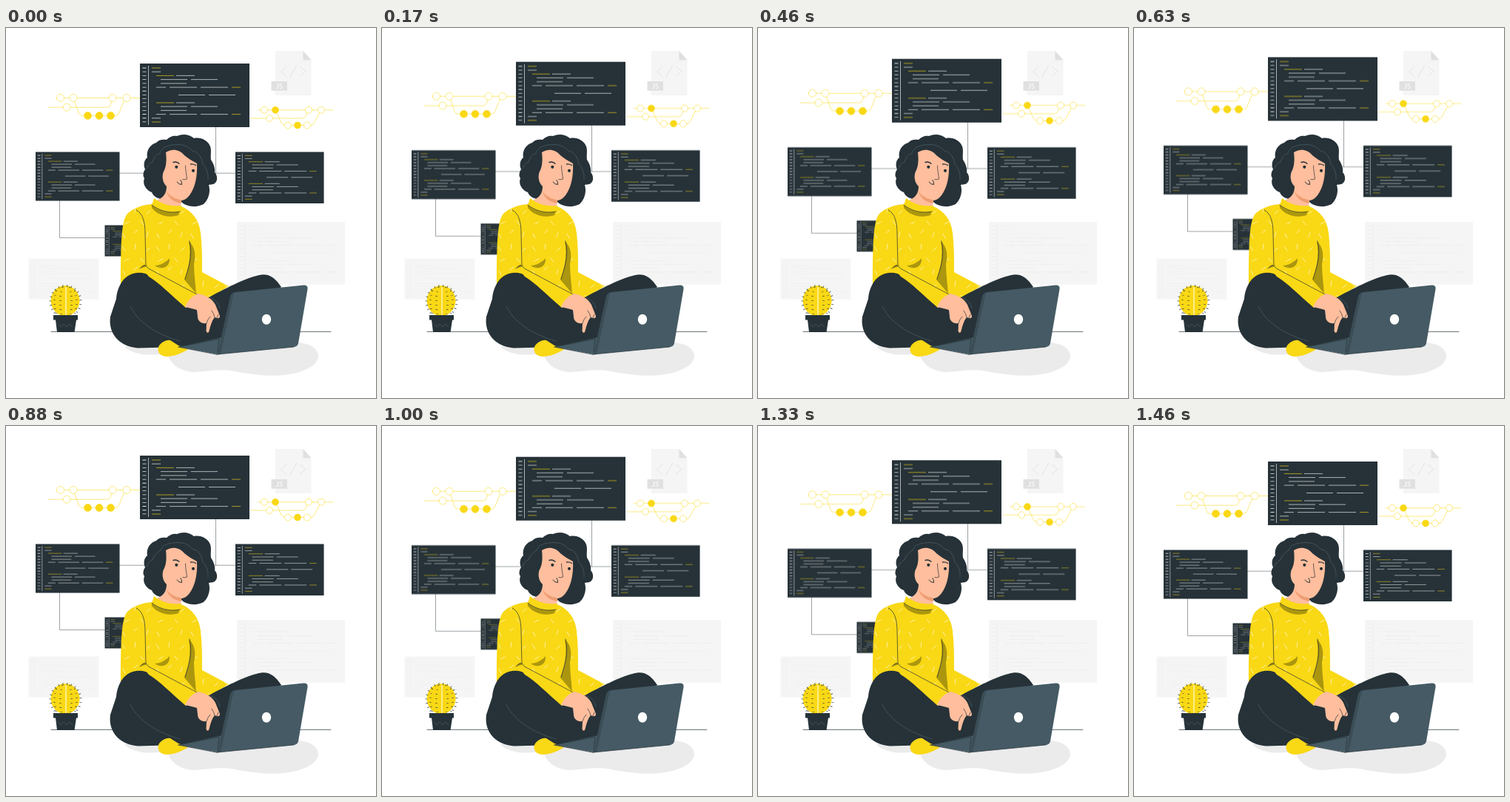
An HTML page that plays this animation: 500 by 500 pixels, repeating every 1.5 s.

```html
<!DOCTYPE html>
<html lang="en">
<head>
<meta charset="utf-8">
<title>Coding</title>
<style>
  html, body { margin: 0; width: 100%; height: 100%; overflow: hidden; background: #fff; }
  svg { display: block; width: 100vw; height: 100vh; }
  :root { --ink: #263238; --sun: #f9d815; --slate: #455a64; --skin: #ffbe9d; --olive: #ab960f; }

  .panel { --bg: var(--ink); --text: #e6e8e8; --mark: #e3c616; }
  .ghost { --bg: #f5f5f5; --text: #ebebeb; --mark: #ebebeb; }
  .bg { fill: var(--bg); }
  .text { stroke: var(--text); fill: none; }
  .mark { stroke: var(--mark); fill: none; }
  .row { stroke-width: .7; }

  .ink { fill: var(--ink); }
  .sun { fill: var(--sun); }
  .skin { fill: var(--skin); }
  .olive { fill: var(--olive); }
  .slate { fill: var(--slate); }
  .line { fill: none; stroke: var(--ink); stroke-width: .7; stroke-linecap: round; stroke-linejoin: round; }
  .hair { stroke-width: .45; }
  .bold { stroke-width: 1.4; }
  .pale { stroke: #526770; stroke-width: .6; }
  .graph { fill: none; stroke: var(--sun); stroke-width: .55; }
  .graph circle { fill: #fff; }
  .graph .full { fill: var(--sun); }

  /* 24 steps a second: up, one rest at the top, down, one rest at the bottom */
  .float { animation: float 1500ms -4ms infinite; }
  @keyframes float {
    0% { transform: translateY(0); animation-timing-function: steps(17); }
    47.2222% { transform: translateY(-9.714px); }
    50% { transform: translateY(-9.714px); animation-timing-function: steps(17); }
    97.2222%, 100% { transform: translateY(0); }
  }
</style>
</head>
<body>
<svg viewBox="0 0 500 500">
  <defs>
    <g id="code">
      <path class="bg" d="M0 0h148v86H0z"/>
      <path class="text" stroke-width="5" stroke-dasharray=".8 4.41" d="M6 5.6v74"/>
      <path class="text row" d="M11.5 3v80"/>
      <path class="text row" d="M16 11.2h12M49 16.4h25M28 21.6h36m5 0h36M28 26.9h35M22 32.1h13m5 0h37m5 0h37
        M52 42.5h36m5 0h36M49 53h25M28 58.1h36m5 0h36M28 63.4h35M22 68.6h13m5 0h37m5 0h37M16 73.8h12"/>
      <path class="mark row" d="M16 6h12M22 16.4h24M124 32.1h12M22 53h24M124 68.6h12M16 79h12"/>
    </g>
    <pattern id="knit" width="46" height="50" patternUnits="userSpaceOnUse" patternTransform="translate(152 238)">
      <path d="M5 7l4 6M23 4l-1 7M38 13l5-4M14 24l-6 3M30 23l4 5M6 40l3 6M21 39l5-4M40 38l-2 6"
        fill="none" stroke="#fff6c8" stroke-width=".8" stroke-linecap="round"/>
    </pattern>
    <path id="sweater" d="M198 238C184 239 172 243 164 251C156 260 155 288 155 348L200 352L243 378L259 365L276 364
      L301 349L265 330C265 312 265 294 263 277C261 259 252 248 237 241C224 250 208 247 198 238z"/>
  </defs>

  <use href="#code" class="ghost" transform="translate(312 262) scale(.986)"/>
  <use href="#code" class="ghost" transform="translate(30.5 311.5) scale(.642)"/>

  <g id="file">
    <path fill="#f5f5f5" d="M364 31h37.500l11 12v48h-48.500z"/>
    <path fill="#e0e0e0" d="M401.500 31l11 12.300h-11z"/>
    <path fill="none" stroke="#e0e0e0" stroke-width=".8" d="M379 52l-7.500 7 7.500 7M393 50l-10 18M397 52l8 6.500-8 6.500"/>
    <path fill="#e0e0e0" d="M358.500 72H380v12.700h-21.500z"/>
    <text x="369.300" y="82" fill="#fff" font-family="Lato, sans-serif" font-size="10" text-anchor="middle">JS</text>
  </g>

  <path fill="#ebebeb" d="M160 430C168 440 188 443 206 441L218 441C223 455 236 465 256 465C274 464 285 461 304 463
    C328 468 352 471 376 469C402 466 422 456 422 443C421 431 408 425 390 425L240 425z"/>
  <path class="line" d="M61 410.400H439"/>

  <g class="float">
    <path class="line hair" d="M283.500 134v62M153 196.200h157M72.500 233v50.500h61"/>
    <g class="graph">
      <path d="M67 94.500h114M57 107.200h80q3 0 4-3l3-9.500M91 94.500l7 20q1.300 3.800 4 3.800h46q4 0 5-3.800l8-20"/>
      <circle cx="73.500" cy="94.500" r="5"/><circle cx="91" cy="94.500" r="5"/>
      <circle cx="144" cy="94.500" r="5"/><circle cx="163" cy="94.500" r="5"/>
      <circle cx="82" cy="107.200" r="5"/>
      <circle class="full" cx="110.500" cy="118.500" r="5"/>
      <circle class="full" cx="126" cy="118.500" r="5"/>
      <circle class="full" cx="141.500" cy="118.500" r="5"/>
    </g>
    <g class="graph">
      <path d="M340 110.800h102M331 122h70q3 0 4-3l4-8M364 110.800l8 17q2 3.700 5 3.700h35q3 0 4.500-3.500l9-17"/>
      <circle cx="349" cy="110.800" r="4.500"/><circle class="full" cx="364" cy="110.800" r="4.500"/>
      <circle cx="409" cy="110.800" r="4.500"/><circle cx="426" cy="110.800" r="4.500"/>
      <circle cx="356" cy="122" r="4.500"/>
      <circle cx="381" cy="131.500" r="4.500"/><circle class="full" cx="394" cy="131.500" r="4.500"/>
      <circle cx="407" cy="131.500" r="4.500"/>
    </g>
    <use href="#code" class="panel" transform="translate(181 48)"/>
    <use href="#code" class="panel" transform="translate(40 167.500) scale(.767)"/>
    <use href="#code" class="panel" transform="translate(310 167.500) scale(.808)"/>
    <use href="#code" class="panel" transform="translate(133.500 266.500) scale(.488)"/>
  </g>

  <g id="cactus">
    <ellipse class="sun" cx="80" cy="368.500" rx="19.500" ry="20.500"/>
    <path fill="none" stroke="#fff" stroke-width="1" d="M81 350v38"/>
    <path fill="none" stroke="#263238" stroke-width="2.500" stroke-dasharray=".6 5.500"
      d="M76 350q-5 18-1 38M86 350q5 18 1 38M68 355q-5 15 0 31M93 355q5 15 0 31"/>
    <path fill="none" stroke="#263238" stroke-width="3" stroke-dasharray=".7 5" d="M66 385A20.500 21.500 0 1 1 95 385"/>
    <path class="ink" d="M64 388h33v6.500h-2l-2.500 16.500h-23.500l-2-16.500h-3z"/>
    <path class="line pale" d="M70 400l4 4 4-4 4 4 4-4 4 4"/>
  </g>

  <g id="woman">
    <path class="ink" d="M203 155C206 151 212 150 217 151C221 147 226 145 231 146C238 143 247 143 254 149
      C263 147 273 152 276 160C278 166 276 171 277 178C281 184 283 190 282 195C286 199 286 206 283 209
      C281 212 277 211 274 212C277 222 273 233 267 238C258 243 244 242 237 235L214 232C206 231 199 228 197 222
      C189 219 184 211 187 203C184 199 186 194 188 191C185 184 187 178 191 175C189 166 195 157 203 155z"/>
    <path class="line pale" d="M190 190q2-7 8-9q2-8 10-12q4-10 17-11q18-3 27 8q12 3 14 18q8 8 7 20"/>

    <path class="skin" d="M216 168C223 163 234 163 241 172C246 176 252 180 258 183C259 201 255 217 248 226
      C244 231 240 233 237 233L236 243C225 249 211 244 203 233C213 230 217 223 217 214C211 209 210 198 214 192
      C217 186 217 176 216 168z"/>
    <path fill="#ed9d72" d="M217 221C222 228 229 231 237 232.500L236.500 237C226 235 219 229 217 221z"/>
    <path class="line" d="M242.500 186c0 7 1.500 12 2 18q-2 1.500-5.500.5"/>
    <path class="line" style="stroke-width:1" d="M231 208q3 4 6.500 3.500q.5-3-1.500-6"/>
    <path class="line bold" d="M226 181.500q4-1.500 8 1.800M249.500 184q4-.5 7 1.500"/>
    <circle class="ink" cx="230.300" cy="187.800" r="2.100"/>
    <circle class="ink" cx="253" cy="192.800" r="2.100"/>

    <use href="#sweater" class="sun"/>
    <use href="#sweater" fill="url(#knit)"/>
    <path class="olive" d="M197 238C208 248 222 251 235 247L233 253C217 258 203 251 197 243z"/>
    <path class="sun" d="M200 230C210 238 224 242 237 240L235 248C220 251 206 247 197 239z"/>
    <path class="line" d="M197 239C207 247 221 251 235 248M176 246C184 250 188 260 188 278L189 321"/>
    <path class="olive" d="M247 288C255 295 257 306 254 319C254 333 256 346 257 359L241 340C246 326 251 310 247 288z
      M201 321C208 321 216 317 221 311C222 323 211 328 201 321zM181 325q5-7 10-5l-3 3z"/>
    <path class="line" d="M248 288C253 308 246 326 242 339"/>

    <path class="ink" d="M176 331C161 333 151 346 149 366L141 390C138 411 151 430 178 432.500L236 431L300 420
      L372 350C364 338 356 332 345 333.500C328 336 300 350 276 363L243 378C231 367 213 347 200 338
      C192 332 185 330 176 331z"/>
    <path class="line pale" d="M168 376C176 393 196 412 235 423M276 364q12 5 13 15"/>
    <path class="sun" d="M185 326q5-6 8 0L260 360L242 377C224 362 207 344 193 336z"/>
    <path class="line" d="M181 325q7-8 11.500 0L260 361"/>
    <path class="sun" d="M207 429C211 424 217 421 222 422L233 429L246 434C238 440 226 444 216 444C207 443 203 436 207 429z"/>
  </g>

  <g id="laptop">
    <path class="slate" d="M233 431L292 418L286 441z"/>
    <path class="line" d="M233 431L288 420L286 441z"/>
    <path class="skin" d="M260 359C270 361 279 366 283 374L289 389Q289 393 285 392L282 391C277 397 276 405 274 411
      Q271 413 270.500 409L271 399C264 400 259 396 259 390L258 381C252 379 247 378 242 377C245 369 251 362 260 359z"/>
    <path class="line" d="M271 399q1-5 5-9M282 391q-1-5-4-9M285 392l2-5"/>
    <path class="slate" d="M310 357L402 347.500Q408.500 347 407.500 353L395 426Q394 430.500 389 431L286 441L303 363Q304.500 357.500 310 357z"/>
    <path fill="#3b4d56" d="M286 441L303 363Q304.500 357.500 310 357Q307.500 359 306.500 364L290 440.600z"/>
    <path class="line" d="M286 441L389 431"/>
    <ellipse cx="352" cy="393.700" rx="6.200" ry="7" fill="#fff"/>
  </g>
</svg>
</body>
</html>
```
